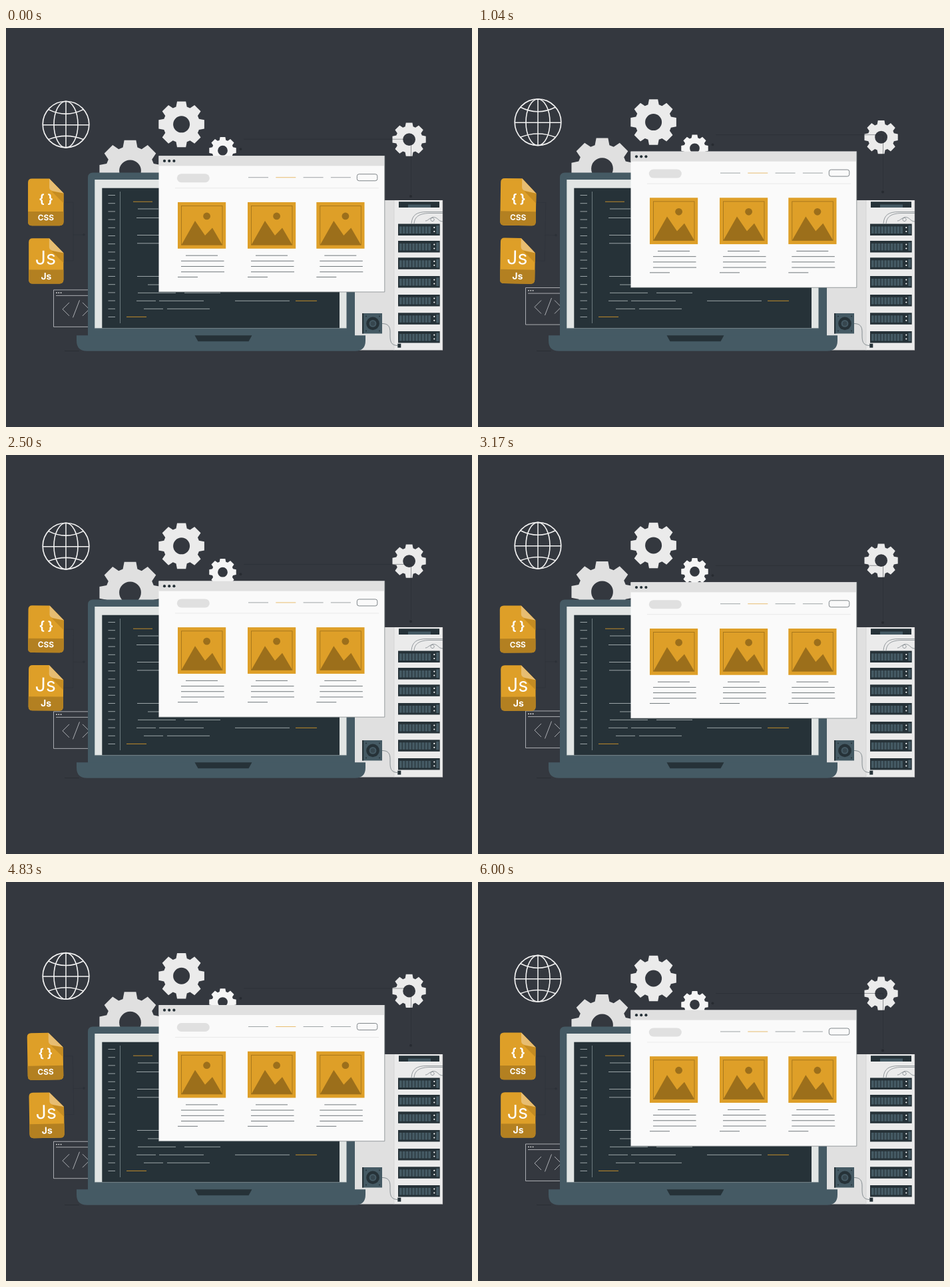
Recreate the animation shown at these times as an HTML page. Size 700 px wide and 600 px high, loop 6040 ms.

```html
<!DOCTYPE html>
<html lang="en">
<head>
<meta charset="utf-8">
<title>Web development</title>
<style>
html, body { margin: 0; width: 100%; height: 100%; overflow: hidden; background: #34383f; }
svg { display: block; width: 100vw; height: 100vh; }
text { font-family: Inter, "Open Sans", sans-serif; fill: #fff; text-anchor: middle; }
.bold { font-weight: 700; }
</style>
</head>
<body>
<svg id="stage" viewBox="0 0 700 600"></svg>
<script>
const LOOP = 6040, FLOAT = 9.66, SWING = 1.3;
const DARK = '#263238', SLATE = '#455a64', LIGHT = '#e0e0e0', PALE = '#ebebeb';
const ORANGE = '#de9f28', BROWN = '#9c6f1b';

const rect = (x, y, w, h, fill, more = '') =>
  `<rect x="${x}" y="${y}" width="${w}" height="${h}" fill="${fill}" ${more}/>`;
const circle = (x, y, r, fill, more = '') =>
  `<circle cx="${x}" cy="${y}" r="${r}" fill="${fill}" ${more}/>`;
const shape = (d, fill) => `<path d="${d}" fill="${fill}" fill-rule="evenodd"/>`;
const line = (d, color, width = 1, more = '') =>
  `<path d="${d}" fill="none" stroke="${color}" stroke-width="${width}" ${more}/>`;
const dash = (x1, x2, y, color, width = 0.9) => line(`M${x1} ${y}H${x2}`, color, width);
const group = (id, content) => `<g id="${id}">${content}</g>`;
const repeat = (n, draw) => Array.from({ length: n }, (_, i) => draw(i)).join('');

function gear(x, y, r, hole, fill) {
  const points = [];
  for (let i = 0; i < 8; i++) {
    for (const [da, k] of [[-0.3, 0.8], [-0.19, 1.015], [0.19, 1.015], [0.3, 0.8]]) {
      const a = i * Math.PI / 4 + da;
      points.push((x + r * k * Math.cos(a)).toFixed(2) + ' ' + (y + r * k * Math.sin(a)).toFixed(2));
    }
  }
  const ring = `M${x - hole} ${y}a${hole} ${hole} 0 1 0 ${2 * hole} 0a${hole} ${hole} 0 1 0 ${-2 * hole} 0Z`;
  return shape(`M${points.join('L')}Z${ring}`, fill);
}

function globe() {
  const white = '#f2f2f2';
  return circle(90, 145.2, 34.8, 'none', `stroke="${white}" stroke-width="1.7"`) +
    `<ellipse cx="90" cy="145.2" rx="18" ry="34.8" fill="none" stroke="${white}" stroke-width="1.6"/>` +
    line('M90 110.4V180M55.2 145.8H124.8', white, 1.5) +
    line('M63.5 122.5Q90 136 116.5 122.5M63 168Q90 157 117 168', white, 1.6);
}

function codeWindow() {
  return line('M71.5 394H140V449.5H71.5ZM75 402.5H140', '#c9cbce', 0.8) +
    repeat(3, i => circle(76 + i * 3.3, 398.3, 0.9, '#e8e8e8')) +
    line('M95 413L85 423L95 433M110.5 409.5L100.5 435.5M115 413L125 423L115 433', '#b9bcc0', 0.9);
}

function file(x, y, w, h, band, labels) {
  const r = x + w, b = y + h;
  const page = `M${x + 6} ${y}H${r - 21.5}L${r} ${y + 22}V${b - 6}Q${r} ${b} ${r - 6} ${b}H${x + 6}` +
    `Q${x} ${b} ${x} ${b - 6}V${y + 6}Q${x} ${y} ${x + 6} ${y}Z`;
  const foot = `M${x} ${band}H${r}V${b - 6}Q${r} ${b} ${r - 6} ${b}H${x + 6}Q${x} ${b} ${x} ${b - 6}Z`;
  return shape(page, ORANGE) + shape(foot, '#b38021') +
    shape(`M${r - 18} ${y + 19}L${r} ${y + 22}V${y + 37}Z`, '#c58c22') +
    shape(`M${r - 21.5} ${y}V${y + 13}Q${r - 21.5} ${y + 17} ${r - 17} ${y + 18.5}L${r} ${y + 22}Z`, '#e7bd72') +
    labels;
}

function files() {
  const link = '#2c3138';
  return line('M87 262H101V350H87M101 311H117', link, 0.8, 'opacity=".6"') + circle(117, 310.8, 1.8, link) +
    file(33, 226.5, 53.5, 70.8, 276,
      `<text x="60" y="263.5" font-size="18.5" class="bold">{ }</text>` +
      `<text x="59.8" y="289.3" font-size="11.8" class="bold">CSS</text>`) +
    file(34.2, 316.2, 52.2, 68.4, 363.5,
      `<text x="59.5" y="355.6" font-size="28.5">Js</text>` +
      `<text x="60.5" y="378.3" font-size="14" class="bold">Js</text>`);
}

function rack(y) {
  return rect(589, y, 62.7, 17.5, DARK) +
    repeat(10, i => rect(591 + i * 4.8, y + 4, 3.7, 10.5, SLATE)) +
    circle(643.3, y + 5.6, 1.1, '#fff') + circle(643.3, y + 11.5, 1.1, '#fff') +
    rect(646.3, y + 2.5, 4, 12.5, SLATE);
}

function server() {
  const cable = '#6d767b';
  return rect(524, 259, 59, 225.5, LIGHT) + rect(583, 259, 73, 225.5, PALE) +
    line('M583 259V484.5', '#cfcfcf', 0.7) + line('M655.7 259V484.5', '#b5b5b5', 0.6) +
    rect(590, 261.2, 61, 8.8, DARK) + rect(604, 265.5, 34, 4.5, SLATE) +
    line('M656 276.5H632C617 276.5 610 281 609 294M656 278.5H636C620 279 614 284 613 294M656 291C649 291 649 284 641 284.5' +
      'C637 285 637 291 641 290.5C644 290 644 286 640.5 285.5C635 286 634 290 630 290', cable, 0.7) +
    [294.5, 320, 345.3, 373, 401, 428.3, 456].map(rack).join('') +
    rect(535, 429, 30, 30.5, SLATE) + rect(535, 429, 2.2, 30.5, DARK) +
    circle(551, 444.4, 9.8, DARK) + circle(551, 444.4, 5.4, SLATE) + circle(551, 444.4, 3.4, '#37474f') +
    repeat(4, i => circle(541 + (i % 2) * 20, 433.5 + (i >> 1) * 22, 0.9, DARK)) +
    line('M565 444.5C574 444.5 577 449 577 457C577 468 576 477 588 477.5', cable, 0.8) +
    rect(588.3, 474.7, 5, 6, DARK);
}

function laptop() {
  const gray = '#a9b1b4';
  const code = [[198, 229, 272], [196, 231, 285.5], [197, 231, 311.5], [197, 231, 323.8], [197, 231, 373.5],
    [213, 231, 386], [198, 255, 398.3], [268, 322, 398.3], [196, 225, 410.3], [230, 297, 410.3],
    [344, 426, 410.3], [207, 236, 422.3], [242, 306, 422.3]];
  const accents = [[191, 220, 261.2], [435, 467, 410.3], [181, 211, 434.4]];
  return line('M88 485.7H110', '#292d33', 0.8) +
    shape('M123 463V225Q123 217.5 130.5 217.5H516.5Q524 217.5 524 225V463Z', SLATE) +
    rect(133.3, 228, 378.2, 223.5, '#e1e5e4') + rect(144.3, 240.7, 356.7, 210.8, DARK) +
    line('M133 451.7H511.5', '#7c8a90', 0.7) +
    line('M171.5 246V444', '#77848a', 0.9) +
    repeat(16, i => dash(153.5, 164, 251.5 + i * 12.2, gray)) +
    code.map(c => dash(...c, gray)).join('') +
    accents.map(c => dash(...c, '#c08c2b', 1)).join('') +
    shape('M106 462.3H540V470Q540 485.7 524.5 485.7H121.5Q106 485.7 106 470Z', SLATE) +
    shape('M283.5 462.3H369.5L364.5 471.2H288.5Z', DARK);
}

function card(dx) {
  const text = [[270, 318, 342.4], [263, 327.5, 350.6], [263, 327.5, 358.8], [263, 328, 367], [258, 288, 374.8]];
  return `<g transform="translate(${dx} 0)">` + rect(258, 262.2, 72.2, 69.8, ORANGE) +
    rect(263.5, 267.8, 61.5, 58.6, 'none', `stroke="${BROWN}" stroke-width=".8"`) +
    circle(301.6, 283.2, 5.4, BROWN) +
    shape('M263.5 326.4L284 290.3L299 312.3L310 300.7L325 326.4Z', BROWN) +
    text.map(t => dash(...t, '#60686c')).join('') + '</g>';
}

function browser() {
  return rect(229.5, 192.6, 339.3, 204.6, '#fafafa') + rect(229.5, 192.6, 339.3, 15, LIGHT) +
    line('M229.5 397.2H568.8V192.6', '#80878a', 0.8) +
    repeat(3, i => circle(238 + i * 7.2, 200.2, 2.1, DARK)) +
    rect(256.8, 219.5, 49, 13, LIGHT, 'rx="6.5"') +
    repeat(4, i => dash(364 + i * 41.3, 394 + i * 41.3, 225, i === 1 ? '#e2ad4c' : '#868d90', 0.8)) +
    rect(527.3, 220, 30.5, 10, 'none', 'rx="3" stroke="#737a7e" stroke-width=".9"') +
    dash(254, 560, 241, '#e8e8e8') +
    [0, 105, 208.3].map(card).join('');
}

function wires() {
  const color = '#272b31';
  return line('M357 167.5H608.5V250', color, 0.7, 'opacity=".65"') +
    circle(352.5, 182.3, 1.9, color) + circle(608, 253.3, 2, color);
}

const floating = globe() + gear(263.6, 145, 34.4, 12.5, PALE) + gear(605.6, 167.7, 25.2, 9.4, PALE) +
  gear(325.5, 184.3, 20.3, 7.4, '#f5f5f5') + gear(186.5, 215, 46.2, 16.4, LIGHT) + codeWindow();

const stage = document.getElementById('stage');
stage.innerHTML = group('floating', floating) + server() + group('wires', wires()) + laptop() +
  group('files', files()) + group('browser', browser());

const part = id => document.getElementById(id);
const parts = { floating: part('floating'), wires: part('wires'), files: part('files'), browser: part('browser') };

// Rises linearly 0 to 1 and falls back within one period.
const triangle = p => 1 - Math.abs(1 - 2 * (p - Math.floor(p)));
const lift = (el, p) => el.setAttribute('transform', `translate(0 ${-FLOAT * triangle(p)})`);

function render(time) {
  const p = (time + 40) / LOOP;
  lift(parts.floating, p);
  lift(parts.browser, 2 * p);
  lift(parts.wires, 2 * p);
  const angle = SWING * (2 * triangle(p + 0.25) - 1);
  parts.files.setAttribute('transform', `rotate(${angle} 78 305)`);
}

const start = performance.now();
function tick() {
  render((performance.now() - start) % LOOP);
  requestAnimationFrame(tick);
}
tick();
</script>
</body>
</html>
```
